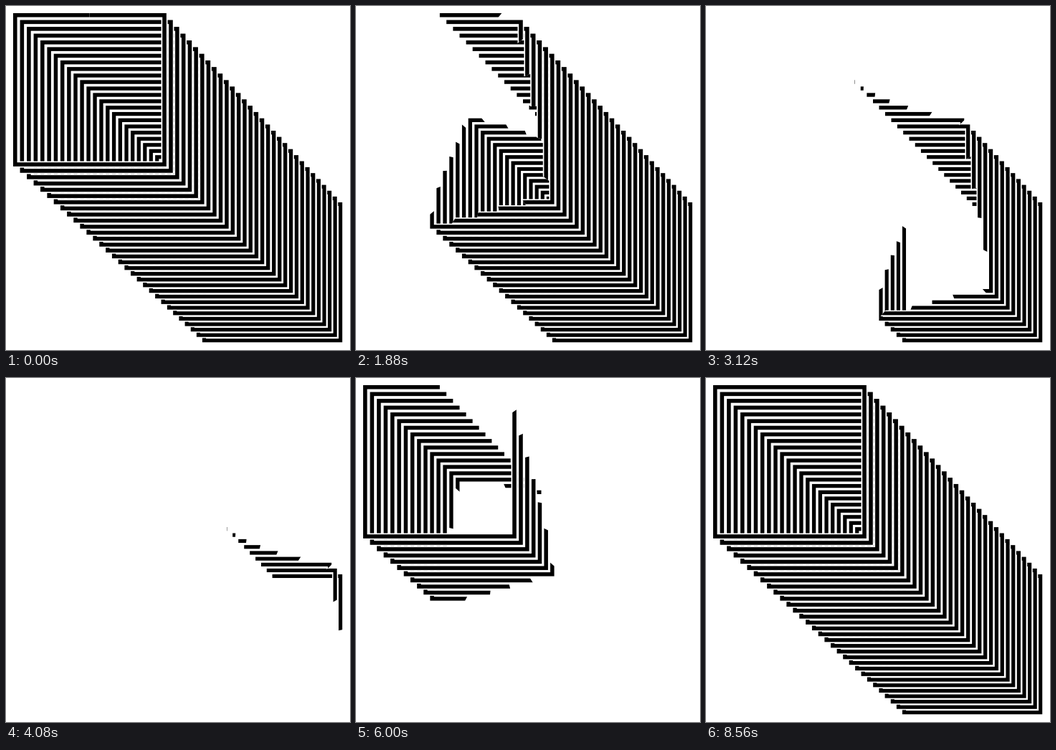
An HTML page with a canvas that plays this animation: 480 px wide and 480 px high, repeating every 8600 ms.

```html
<!DOCTYPE html>
<html>
<head>
<meta charset="utf-8">
<style>
  html, body { margin: 0; width: 100%; height: 100%; overflow: hidden; background: #fff; }
  canvas { display: block; }
</style>
</head>
<body>
<canvas id="stage" width="480" height="480"></canvas>
<script>
const ctx = document.getElementById('stage').getContext('2d');
const LOOP = 8600, STEP = 40, LEAD = 40;
const COUNT = 31, STAGGER = 80, SWEEP = 2400, RETURN = 4720;
const TURN = 2 * Math.PI;

// Cubic bezier easing with flat ends: control points (x1, 0) and (x2, 1)
function ease(u, x1, x2) {
  if (u <= 0) return 0;
  if (u >= 1) return 1;
  let lo = 0, hi = 1;
  for (let n = 0; n < 30; n++) {
    const s = (lo + hi) / 2, q = 1 - s;
    const x = 3 * s * q * q * x1 + 3 * s * s * q * x2 + s * s * s;
    if (x < u) lo = s; else hi = s;
  }
  return lo * lo * (3 - 2 * lo);
}

function drawSquare(i, time) {
  const local = time - i * STAGGER;
  const gone = ease(local / SWEEP, 0.5, 0.635);
  const back = ease((local - RETURN) / SWEEP, 0.09, 0.27);
  const from = back > 0 ? 1 - back : 0;
  const to = back > 0 ? 1 : 1 - gone;
  if (to <= from) return;

  // Perspective: each square is a little further away
  const scale = 1 / (1 + 0.00317 * i);
  const center = 116.9 + 9.297 * i * scale;
  ctx.save();
  ctx.translate(center, center);
  ctx.scale(scale, scale);
  if (to - from < 1) {
    ctx.beginPath();
    ctx.moveTo(0, 0);
    ctx.arc(0, 0, 200, (from - 0.25) * TURN, (to - 0.25) * TURN);
    ctx.closePath();
    ctx.clip();
  }
  const half = 104.15;
  for (const [color, width] of [['#fff', 9], ['#000', 5.6]]) {
    ctx.strokeStyle = color;
    ctx.lineWidth = width;
    ctx.strokeRect(-half, -half, 2 * half, 2 * half);
  }
  ctx.restore();
}

function frame() {
  const now = Math.floor((performance.now() + 4) / STEP) * STEP;
  const time = (now + LEAD) % LOOP;
  ctx.fillStyle = '#fff';
  ctx.fillRect(0, 0, 480, 480);
  for (let i = COUNT - 1; i >= 0; i--) drawSquare(i, time);
  requestAnimationFrame(frame);
}
frame();
</script>
</body>
</html>
```
